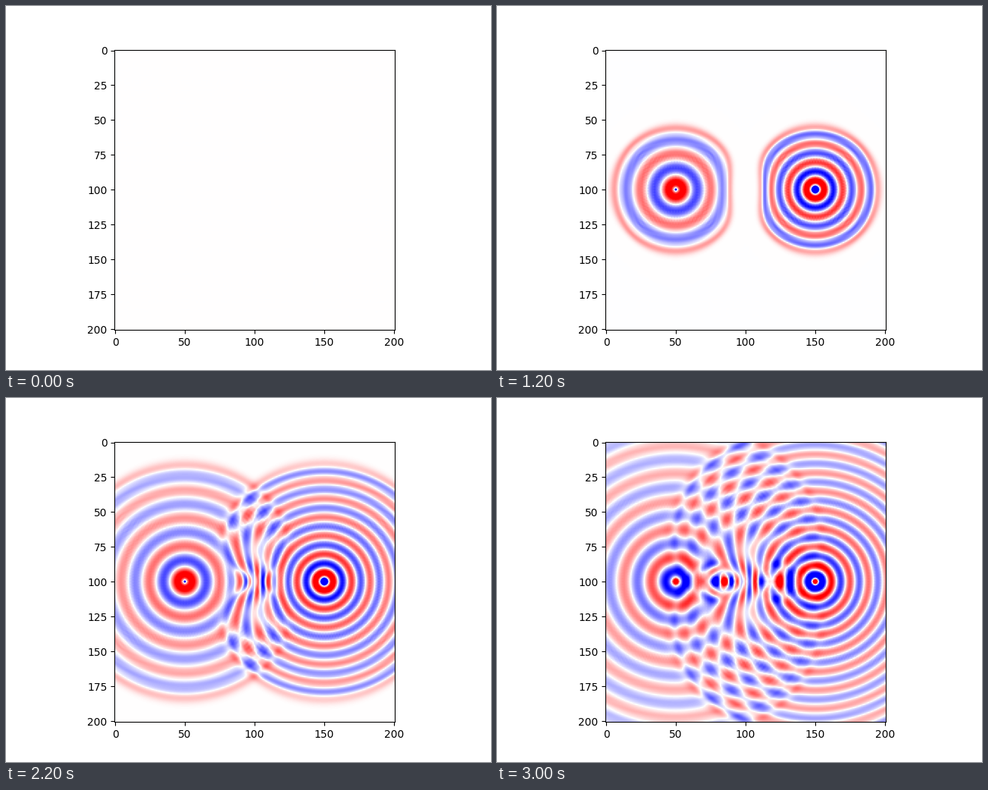
Animation of 640 by 480 pixels, one loop 3.1 s. Source, as a matplotlib script:

```python
import numpy as np
import matplotlib.pyplot as plt
from matplotlib.animation import FuncAnimation

SIZE = 201          # visible cells per side
PAD = 40            # hidden margin so that no echo returns into view
COURANT = 0.4
STEPS_PER_FRAME = 10
FRAMES = 31
SOURCES = [(100, 50, 0.02), (100, 150, 0.03)]   # row, column, cycles per step


def permittivity():
    """Vacuum with a smooth dense lens in the middle."""
    axis = np.arange(SIZE + 2 * PAD) - PAD - SIZE // 2
    x, y = np.meshgrid(axis, axis)
    return 1 + 3 * np.exp(-(x**2 + y**2) / 15**2)


def simulate():
    """Leapfrog the electric and magnetic fields, keeping one snapshot per frame."""
    eps = permittivity()
    n = len(eps)
    ez = np.zeros((n, n))
    hx = np.zeros((n - 1, n))
    hy = np.zeros((n, n - 1))
    gain = COURANT / eps[1:-1, 1:-1]
    view = slice(PAD, PAD + SIZE)
    snapshots = []
    for step in range((FRAMES - 1) * STEPS_PER_FRAME + 1):
        hx -= COURANT * np.diff(ez, axis=0)
        hy += COURANT * np.diff(ez, axis=1)
        curl = np.diff(hy, axis=1)[1:-1] - np.diff(hx, axis=0)[:, 1:-1]
        ez[1:-1, 1:-1] += gain * curl
        for row, col, freq in SOURCES:
            ez[PAD + row, PAD + col] += np.sin(2 * np.pi * freq * step)
        if step % STEPS_PER_FRAME == 0:
            snapshots.append(ez[view, view].copy())
    return snapshots


waves = simulate()
fig, ax = plt.subplots(figsize=(6.4, 4.8), dpi=100)
image = ax.imshow(waves[0], cmap="bwr", vmin=-0.1, vmax=0.1)


def draw(frame):
    image.set_data(waves[frame])
    return [image]


anim = FuncAnimation(fig, draw, frames=FRAMES, interval=100, repeat=True, repeat_delay=0)
plt.show()
```
